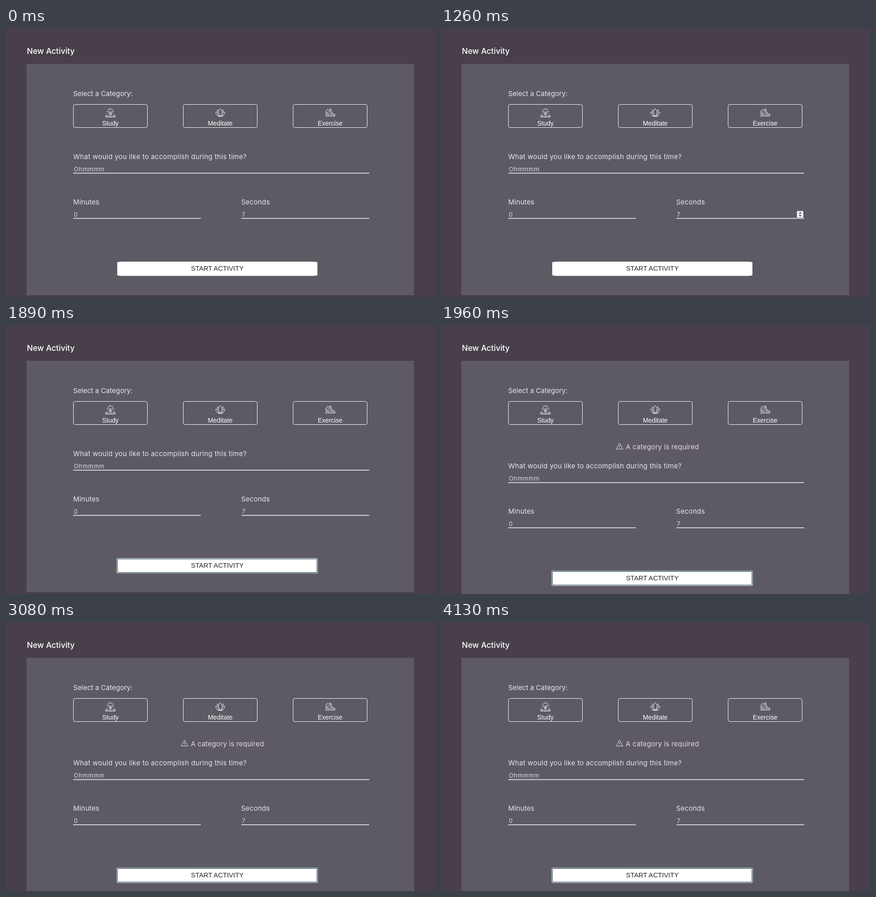
An HTML page for the animation above (4.27 s loop, 945 px wide and 593 px high).

```html
<!DOCTYPE html>
<html lang="en">
<head>
<meta charset="utf-8">
<title>New Activity</title>
<style>
  html, body { margin: 0; height: 100%; overflow: hidden; background: #483f4b; }
  svg { display: block; width: 945px; height: 593px; }
  text { font: 15px Inter, "Open Sans", sans-serif; fill: #e8e6ea; letter-spacing: .2px; }
  text.title { font-size: 17.4px; font-weight: 500; fill: #fff; letter-spacing: 0; }
  text.value { font-size: 13px; letter-spacing: .75px; fill: #dddbe0; }
  text.button { font: 14.2px "Liberation Sans", Arial, sans-serif; fill: #fff; letter-spacing: 0; text-anchor: middle; }
  text.start { font-size: 14.7px; fill: #25222a; }
  #error text { fill: #ead5e8; }
  .line { fill: #e9e8eb; }
  .icon { fill: none; stroke: #f4f3f5; stroke-width: .95; stroke-linecap: round; stroke-linejoin: round; }
</style>
</head>
<body>
<svg viewBox="0 0 945 593">
  <rect x="45" y="79" width="854" height="510" fill="#5d5a64" id="panel"/>
  <text class="title" x="46" y="57">New Activity</text>
  <text x="148" y="150" style="letter-spacing:0">Select a Category:</text>
  <g id="categories"></g>

  <g id="error">
    <path class="icon" d="M393.5 260.5L400.5 273.5H386.5ZM393.5 265v4.5M393.5 271.3v.2"/>
    <text x="407" y="274">A category is required</text>
  </g>

  <g id="form">
    <text x="148" y="288.5" style="letter-spacing:.3px">What would you like to accomplish during this time?</text>
    <text class="value" x="149.5" y="316">Ohmmmm</text>
    <rect class="line" x="148" y="319.2" width="652" height="1.7"/>
    <text x="148" y="388.5">Minutes</text>
    <text class="value" x="149.5" y="415.5">0</text>
    <rect class="line" x="148" y="418.8" width="281" height="1.7"/>
    <text x="518" y="388.5">Seconds</text>
    <text class="value" x="519.5" y="415.5">7</text>
    <rect class="line" x="518.5" y="418.8" width="281.5" height="1.7"/>
    <g id="spinner">
      <rect x="784" y="403.5" width="14" height="14.5" fill="#f3f3f4"/>
      <path d="M788 409.3l3.2-3.8 3.2 3.8zM788 412.3l3.2 3.8 3.2-3.8z" fill="#4a4850"/>
    </g>
    <path id="plain" d="M263 515H668Q686 515 686 517V544.5Q686 546.5 668 546.5H263Q245 546.5 245 544.5V517Q245 515 263 515Z" fill="#fff"/>
    <g id="focus">
      <rect x="243.7" y="514" width="443" height="33.6" rx="3" fill="#fff"/>
      <rect x="245.3" y="515.6" width="439.8" height="30.4" rx="1.8" fill="#fff" stroke="#27485a" stroke-width="1.3"/>
    </g>
    <text class="button start" x="465.5" y="535.3">START ACTIVITY</text>
  </g>
</svg>
<script>
const LOOP = 4270, HOVER = 840, LEAVE = 1820, CLICK = 1890, ERROR = 1960, SHIFT = 27.4;
const get = id => document.getElementById(id);

// Icon paths are centred on the button axis.
const icons = {
  Study: `M-2 190Q-2 188.5 -3.6 187A5 5 0 1 1 3.6 187Q2 188.5 2 190ZM-2 192H2
    M-1 190V186L-2 184.5 0 185.5 2 184.5 1 186V190
    M0 176.5v1.2M-6 178.5l1 1M6 178.5l-1 1M-8.5 184h1.4M8.5 184h-1.4M-7 189l1-.8M7 189l-1-.8
    M0 196Q-4 192.5 -8 194.5L-10.5 192.5V196.5H10.5V192.5L8 194.5Q4 192.5 0 196
    M-8 191v3.5M8 191v3.5`,
  Meditate: `M0 194.8Q-8 186 0 177.5Q8 186 0 194.8
    M-3.8 183Q-4.5 181 -6.3 180Q-8.2 189 0 194.8Q8.2 189 6.3 180Q4.5 181 3.8 183
    M-6.5 185.5L-10.2 185.5Q-9 194.5 0 194.8Q9 194.5 10.2 185.5L6.5 185.5
    M-7 193Q-4 196.5 0 194.8Q4 196.5 7 193`,
  Exercise: `M-9 182.5L-5.5 178.5 -3.5 180.5 .5 177.8 2.5 181.5 2 184 6 188.5 10 189.8Q11 191.5 10.3 194.5H-1L-9 186.5Z
    M-9 184.5L0 192H10.5M-2 181.5L2 180M-1 183.5L2.2 182M1 185.5L3 184.3M3 187.5L5 186.3
    M-6 181.5L-3 184.5 1 188.5 6 189.5
    M-10.5 189h4M-10.5 191.7h7M-10.5 194.5h8`
};
get("categories").innerHTML = Object.entries(icons).map(([name, d], i) => `
  <g transform="translate(${230 + 242 * i})">
    <rect x="-81.5" y="168.5" width="163" height="51" rx="4" fill="none" stroke="#fff"/>
    <path class="icon" d="${d}"/>
    <text class="button" y="215">${name}</text>
  </g>`).join("");

const show = (id, on) => get(id).style.display = on ? "" : "none";

function draw(now) {
  const t = now % LOOP, failed = t >= ERROR, focused = t >= CLICK;
  show("spinner", t >= HOVER && t < LEAVE);
  show("plain", !focused);
  show("focus", focused);
  show("error", failed);
  get("form").setAttribute("transform", `translate(0 ${failed ? SHIFT : 0})`);
  get("panel").setAttribute("height", 510 + (failed ? SHIFT : 0));
  requestAnimationFrame(draw);
}
draw(performance.now());
</script>
</body>
</html>
```
